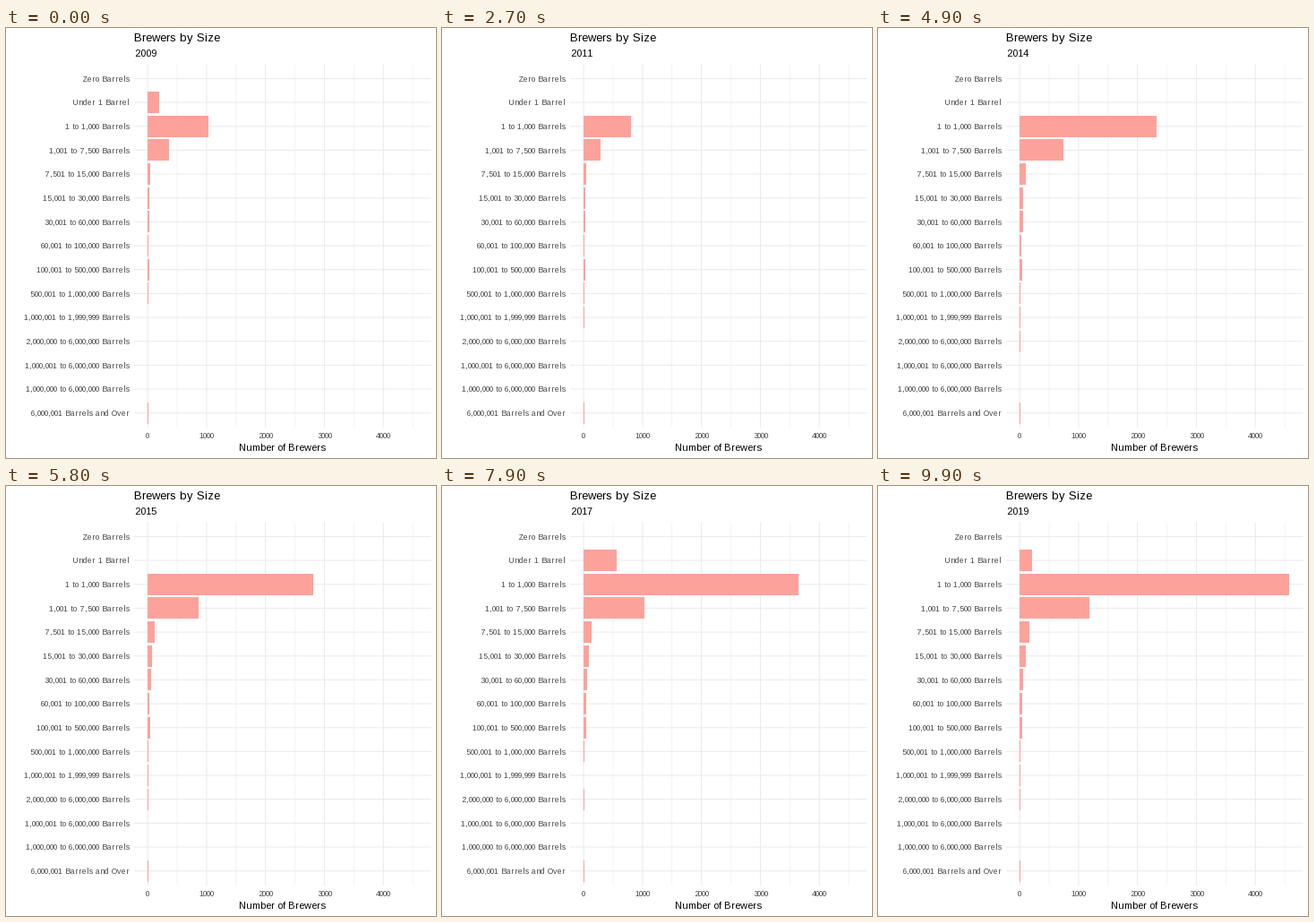
A matplotlib script that plays this animation: 480x480 px, repeating every 10000 ms.

```python
import numpy as np
import matplotlib.pyplot as plt
from matplotlib.animation import FuncAnimation
from matplotlib.patches import Rectangle

# Whole-pixel letter spacing, as in small screen text
plt.rcParams.update({"font.family": "Liberation Sans", "text.hinting_factor": 1})

W = H = 480
FRAMES, INTERVAL = 100, 100
FIRST, LAST = 2009, 2019
LEFT, RIGHT, TOP, BOTTOM = 143, 474.5, 40.45, 445.7
ROW = (BOTTOM - TOP) / 15.2
X0, PX = 158.1, 0.06578
BAR, GRID, TICK = "#fca29b", "#ebebeb", "#4d4d4d"

SIZES = [
    "Zero Barrels", "Under 1 Barrel", "1 to 1,000 Barrels",
    "1,001 to 7,500 Barrels", "7,501 to 15,000 Barrels",
    "15,001 to 30,000 Barrels", "30,001 to 60,000 Barrels",
    "60,001 to 100,000 Barrels", "100,001 to 500,000 Barrels",
    "500,001 to 1,000,000 Barrels", "1,000,001 to 1,999,999 Barrels",
    "2,000,000 to 6,000,000 Barrels", "1,000,001 to 6,000,000 Barrels",
    "1,000,000 to 6,000,000 Barrels", "6,000,001 Barrels and Over",
]


def counts(year):
    """Brewers per size class; larger classes follow the 1 to 1,000 class."""
    n = np.interp(year, [2009, 2010, 2011, 2014, 2016, 2017, 2018, 2019],
                  [1033, 1186, 806, 2327, 3285, 3650, 4240, 4578])
    tiny = np.interp(year, [2009, 2010, 2015, 2016, 2017, 2019],
                     [195, 0, 0, 487, 563, 213])
    few = 10
    return [
        0,
        tiny,
        n,
        n * (0.385 - 2.75e-5 * n),
        n * (0.05 - 3e-6 * n),
        12 + 0.0215 * n,
        min(62, 6 + 0.028 * n),
        min(45, 8 + 0.0095 * n),
        min(46, 20 + 0.01 * n),
        few,
        few * (year >= 2011 and year not in (2016, 2017)),
        few * (year >= 2012),
        0,
        few * (year == 2010),
        few,
    ]


fig = plt.figure(figsize=(W / 72, H / 72), dpi=72, facecolor="white")
ax = fig.add_axes([0, 0, 1, 1])
ax.set(xlim=(0, W), ylim=(H, 0))
ax.axis("off")


def grid(xs, ys, lw=1.07):
    ax.plot(xs, ys, color=GRID, lw=lw, solid_capstyle="butt", snap=False, zorder=1)


def label(x, y, text, size, color="black", ha="left"):
    return ax.text(x, y, text, fontsize=size, color=color, ha=ha, va="baseline")


for n in range(0, 5000, 500):
    x = X0 + n * PX
    major = n % 1000 == 0
    grid([x, x], [TOP, BOTTOM], 1.07 if major else 0.53)
    if major:
        label(x, 458, str(n), 8.8, TICK, "center")

bars = []
for k, name in enumerate(SIZES):
    y = TOP + (0.6 + k) * ROW
    grid([LEFT, RIGHT], [y, y])
    label(138.3, y + 3.15, name, 8.8, TICK, "right")
    top, bottom = round(y - 0.45 * ROW), round(y + 0.45 * ROW)
    bar = Rectangle((round(X0), top), 0, bottom - top, fc=BAR, lw=0, zorder=2)
    bars.append(ax.add_patch(bar))

label(143, 15, "Brewers by Size", 13.2)
subtitle = label(143, 32, "", 11)
label((LEFT + RIGHT) / 2, 472, "Number of Brewers", 11, ha="center")


def update(i):
    year = FIRST + i * (LAST - FIRST + 1) // FRAMES
    subtitle.set_text(str(year))
    for bar, n in zip(bars, counts(year)):
        bar.set_width(round(X0 + n * PX) - round(X0))
    return [subtitle, *bars]


anim = FuncAnimation(fig, update, frames=FRAMES, interval=INTERVAL,
                     repeat=True, repeat_delay=0)
plt.show()
```
